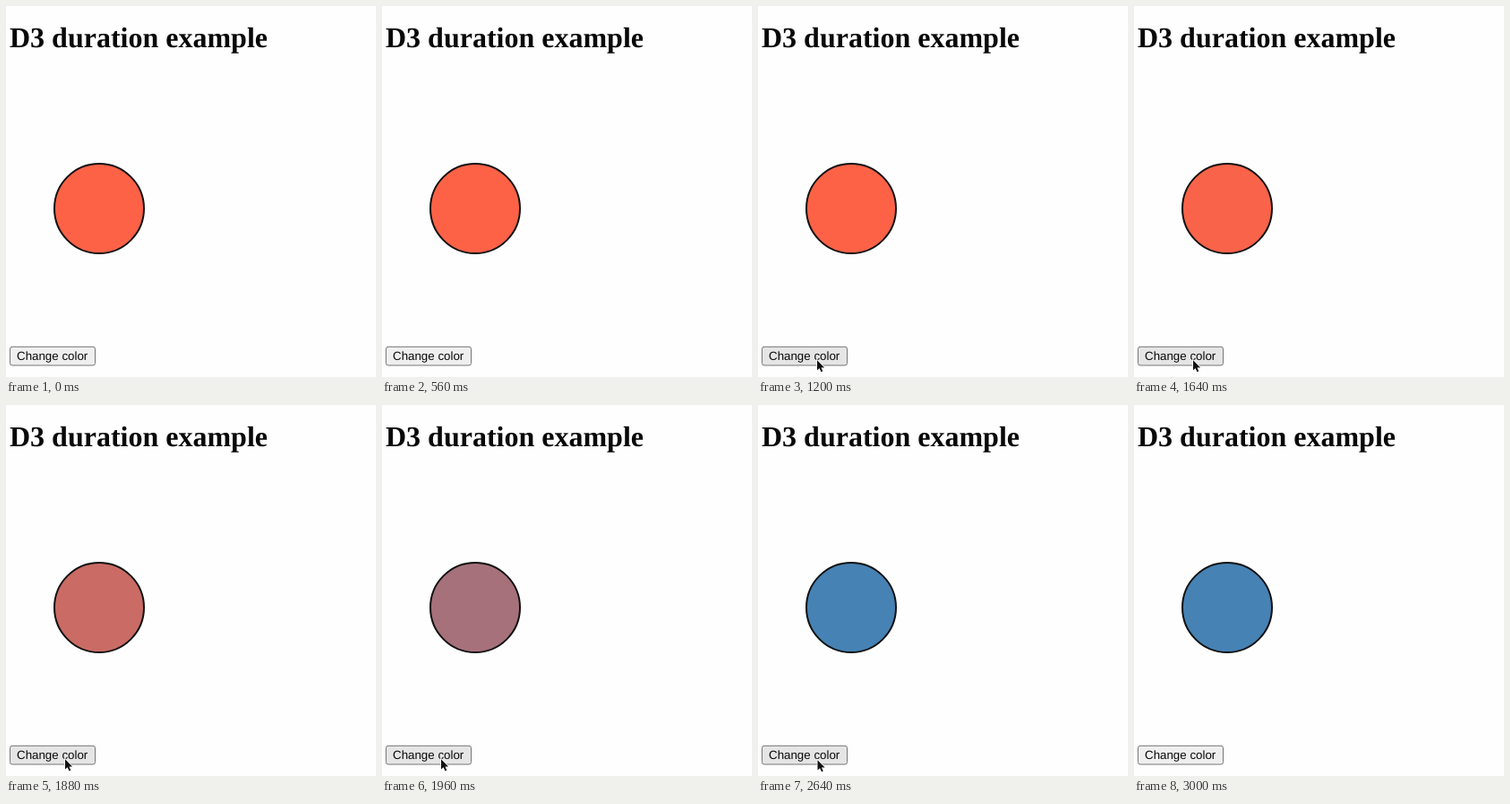
Write an HTML page that moves like this. It is 413 by 414 pixels and loops after 3880 ms.

```html
<!DOCTYPE html>
<html lang="en">
<head>
<meta charset="utf-8">
<title>D3 duration example</title>
<style>
  html, body { margin: 0; width: 100%; height: 100%; overflow: hidden; background: #fefefe; }
  svg { display: block; width: 413px; height: 414px; }
  text { text-rendering: geometricPrecision; fill: #080808; }
  .title { font: bold 32px "Liberation Serif", Times, serif; }
  .label { font: 13.333px "Liberation Sans", Arial, sans-serif; }
</style>
</head>
<body>
<svg viewBox="0 0 413 414">
  <text class="title" x="4" y="46">D3 duration example</text>
  <circle id="circle" cx="104" cy="226" r="50" stroke="#111" stroke-width="2"/>
  <rect id="button" x="4.5" y="380.3" width="95" height="20.7" rx="2.5" stroke="#767676"/>
  <text class="label" x="12" y="395">Change color</text>
  <path id="cursor" d="M0 0V11.2L2.6 8.9L4.5 13.1L6.3 12.3L4.5 8.2H8.1Z" fill="#111" stroke="#fff" stroke-width="1.6" paint-order="stroke"/>
</svg>
<script>
  const LOOP = 3880;
  const TOMATO = [253, 98, 71], STEELBLUE = [70, 130, 180];
  const [circle, button, cursor] = ['circle', 'button', 'cursor'].map(id => document.getElementById(id));

  const progress = (t, start, end) => Math.min(1, Math.max(0, (t - start) / (end - start)));
  const easeCubic = p => p < 0.5 ? 4 * p ** 3 : 1 - 4 * (1 - p) ** 3;
  const mix = (a, b, p) => a.map((v, i) => Math.round(v + (b[i] - v) * p));

  function draw(t) {
    // A one-second color transition begins when the button is released.
    const color = mix(TOMATO, STEELBLUE, easeCubic(progress(t, 1470, 2470)));
    circle.setAttribute('fill', `rgb(${color})`);

    // The pointer enters and leaves through the bottom edge.
    const away = (1 - progress(t, 600, 1040)) ** 2 + progress(t, 2560, 2960) ** 2;
    const x = 66 + 12 * away, y = 395.3 + 23 * away;
    cursor.setAttribute('transform', `translate(${x} ${y})`);

    const pressed = t >= 1360 && t < 1470;
    button.setAttribute('fill', pressed ? '#f5f5f5' : y < 401 ? '#e5e5e5' : '#efefef');
  }

  function frame() {
    draw(performance.now() % LOOP);
    requestAnimationFrame(frame);
  }
  frame();
</script>
</body>
</html>
```
